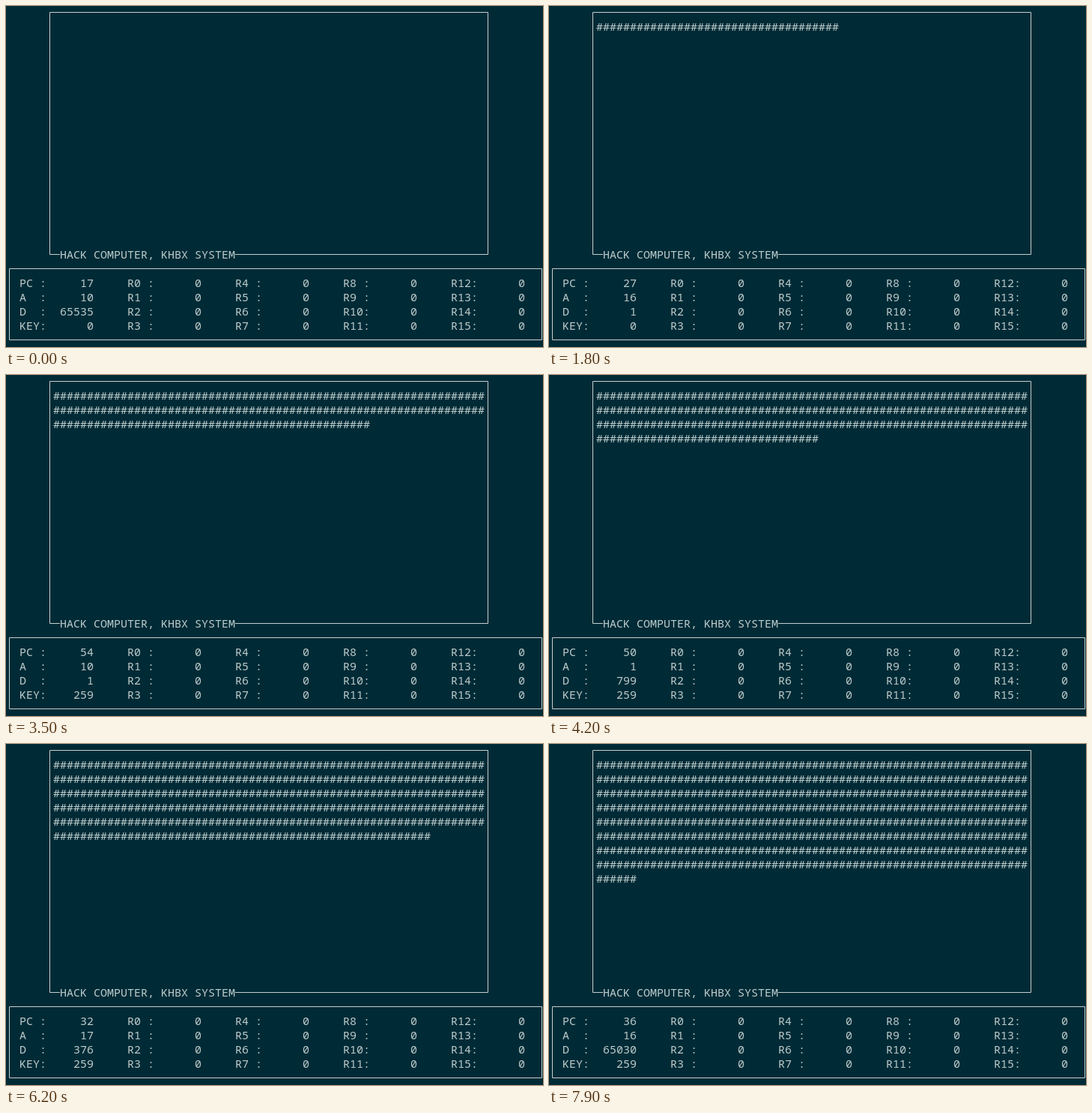
An HTML page that plays this animation: 717x455 px, repeating every 8 s.

```html
<!DOCTYPE html>
<html lang="en">
<head>
<meta charset="utf-8">
<title>Hack computer</title>
<style>
  html, body { margin: 0; width: 100%; height: 100%; overflow: hidden; background: #002b36; }
  svg { position: absolute; left: 0; top: 0; }
  path { fill: none; stroke: #c3d0d0; stroke-width: 1; }
  pre {
    position: absolute; left: 0; top: -1px; margin: 0;
    font: 15px/19px "Noto Sans Mono", "Liberation Mono", monospace;
    font-variant-ligatures: none;
    color: #bccbcc;
  }
</style>
</head>
<body>
<svg width="717" height="455">
  <path d="M72 331.5H58.5V8.5H643.5V331.5H306M4.5 350.5H715.5V445.5H4.5Z"/>
</svg>
<pre id="term"></pre>
<script>
const LOOP = 8000, STEP = 100, COLS = 64;
const term = document.getElementById('term');

// [step, filled cells], linear in between
const FILL = [[0, 0], [11, 88], [18, 36], [27, 117], [28, 125],
              [42, 225], [53, 312], [62, 376], [79, 518]];

// The machine stalls briefly at these steps
const STALL = { 25: 24, 26: 24, 29: 28 };

// [PC, A, D] snapshots while filling and while erasing
const filling = p => [
  [24, 16, 1], [40, 17, p], [50, 1, 1024 - p], [54, 10, 1],
  [45, 1024, p], [54, 10, 1], [32, 17, p], [36, 16, 64512 + p]
];
const erasing = p => [
  [17, 10, 65535], [32, 17, p], [27, 16, 1], [50, 1, 1024 - p]
];

function cellsAt(n) {
  const i = FILL.findIndex(k => k[0] >= n);
  if (i < 1) return 0;
  const [n0, c0] = FILL[i - 1], [n1, c1] = FILL[i];
  return Math.round(c0 + (c1 - c0) * (n - n0) / (n1 - n0));
}

const reg = (name, value) => name.padEnd(3) + ':' + String(value).padStart(7);

function screen(n) {
  const cells = cellsAt(n);
  const key = n === 0 || (n > 11 && n < 19) ? 0 : 259;
  const states = key ? filling(cells) : erasing(cells);
  const [pc, a, d] = states[n % states.length];
  const lines = Array(24).fill('');

  for (let r = 0; r * COLS < cells; r++)
    lines[r + 1] = ' '.repeat(7) + '#'.repeat(Math.min(COLS, cells - r * COLS));

  lines[17] = ' '.repeat(8) + 'HACK COMPUTER, KHBX SYSTEM';

  [['PC', pc], ['A', a], ['D', d], ['KEY', key]].forEach(([name, value], r) => {
    const row = [reg(name, value)];
    for (let c = 0; c < 4; c++) row.push(reg('R' + (c * 4 + r), 0));
    lines[19 + r] = '  ' + row.join(' '.repeat(5));
  });
  return lines.join('\n');
}

let shown = -1;
const start = performance.now();

function draw(now) {
  const t = Math.max(0, now - start) % LOOP;
  const step = Math.floor(t / STEP);
  const n = STALL[step] ?? step;
  if (n !== shown) term.textContent = screen(shown = n);
  requestAnimationFrame(draw);
}
draw(start);
</script>
</body>
</html>
```
